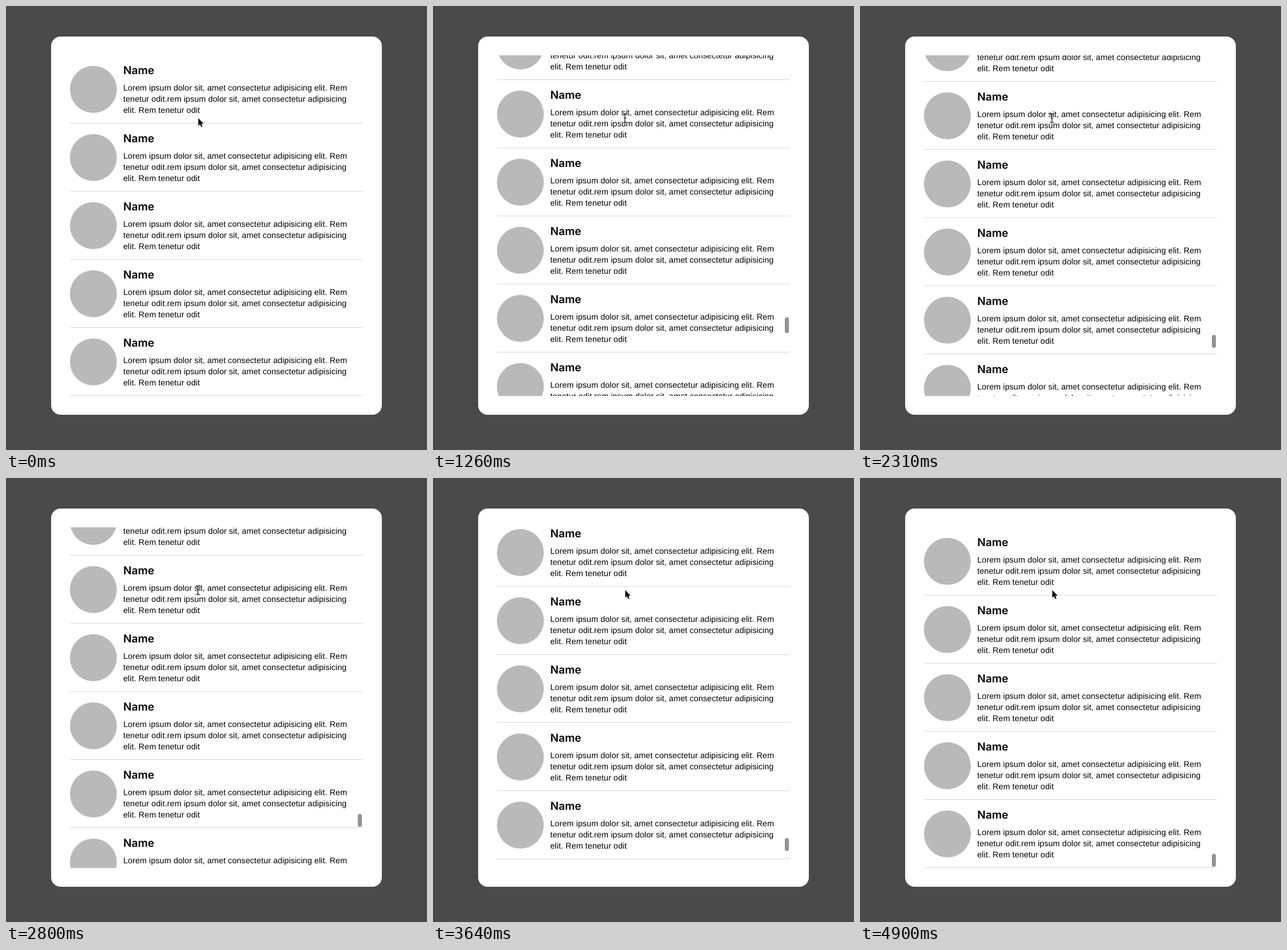
These frames come from a looping animation (718 px wide and 756 px high, 4970 ms). An HTML page:

```html
<!DOCTYPE html>
<html lang="en">
<head>
<meta charset="utf-8">
<title>Endless list</title>
<style>
  html, body { margin: 0; width: 100%; height: 100%; overflow: hidden; background: #4a4a4a; }
  svg { display: block; }
  text { fill: #000; text-rendering: geometricPrecision; }
  .name { font: 600 18.7px Inter, sans-serif; }
  .copy { font: 14px "Liberation Sans", Arial, sans-serif; letter-spacing: .07px; }
</style>
</head>
<body>
<svg width="718" height="756" viewBox="0 0 718 756">
  <defs>
    <clipPath id="view"><rect x="109" y="84" width="500" height="580"/></clipPath>
    <g id="row">
      <circle cx="149" cy="58" r="40" fill="#b9b9b9"/>
      <text class="name" x="200" y="32">Name</text>
      <text class="copy" x="200" y="60">Lorem ipsum dolor sit, amet consectetur adipisicing elit. Rem</text>
      <text class="copy" x="200" y="79">tenetur odit.rem ipsum dolor sit, amet consectetur adipisicing</text>
      <text class="copy" x="200" y="98">elit. Rem tenetur odit</text>
      <rect x="109" y="115" width="500" height="1" fill="#d8d8d8"/>
    </g>
    <path id="stem" d="M324 183q3 0 3.3 2.5q.3-2.5 3.3-2.5M327.3 185.5v11M324 199q3 0 3.3-2.5q.3 2.5 3.3 2.5M325.5 191h3.6"/>
  </defs>
  <rect width="718" height="756" fill="#4a4a4a"/>
  <rect x="77" y="52" width="564" height="644" rx="16" fill="#fff"/>
  <g clip-path="url(#view)">
    <g id="list"></g>
    <rect id="thumb" x="600" width="7" rx="3.5" fill="#929292"/>
  </g>
  <path id="arrow" d="M328 191v13l2.9-2.7 2 4.6 2.1-.9-1.9-4.5h4z"
        stroke="#fff" stroke-width="1.4" paint-order="stroke" stroke-linejoin="round"/>
  <g id="beam" fill="none" stroke-linecap="round">
    <use href="#stem" stroke="#fff" stroke-width="2.4" stroke-opacity=".6"/>
    <use href="#stem" stroke="#000" stroke-width="1.1"/>
  </g>
</svg>
<script>
const LOOP = 4970, STEP = 70;
const TOP = 84, VIEW = 580, ROW = 116, FIRST = 6, PAGE = 20, PAGES = 7;
const POINTER_Y = 191;

// [time, scroll offset]: a fast run down, then shorter swipes near the end
const keys = [
  [0, 0], [630, 3175], [1820, 13538], [2800, 14336],
  [3640, 15559], [4200, 15073], [4900, 16356]
];

const $ = id => document.getElementById(id);
const list = $('list'), thumb = $('thumb'), arrow = $('arrow'), beam = $('beam');

list.innerHTML = Array.from({ length: 6 }, (_, i) => `<use href="#row" y="${i * ROW}"/>`).join('');

// Monotone cubic slopes: harmonic mean of neighbouring speeds, zero at a turn.
const speed = i => (keys[i + 1][1] - keys[i][1]) / (keys[i + 1][0] - keys[i][0]);
const slopes = keys.map((_, i) => {
  if (i === 0) return speed(0) * .6;
  if (i === keys.length - 1) return speed(i - 1) * .6;
  const a = speed(i - 1), b = speed(i);
  return a * b > 0 ? 2 * a * b / (a + b) : 0;
});

function scrollAt(t) {
  let i = 0;
  while (i < keys.length - 2 && t >= keys[i + 1][0]) i++;
  const [t0, s0] = keys[i], [t1, s1] = keys[i + 1];
  const d = t1 - t0, u = Math.min(1, (t - t0) / d), v = 1 - u;
  return Math.round(
    s0 * (1 + 2 * u) * v * v + slopes[i] * d * u * v * v +
    s1 * u * u * (3 - 2 * u) - slopes[i + 1] * d * u * u * v
  );
}

// A page is appended once less than one view is left below the visible part.
function contentHeight(scroll) {
  const needed = Math.ceil((scroll + 2 * VIEW - FIRST * ROW) / (PAGE * ROW));
  return (FIRST + Math.min(PAGES, needed) * PAGE) * ROW;
}

function draw(now) {
  const t = Math.floor(now % LOOP / STEP) * STEP;
  const scroll = scrollAt(t), shift = scroll % ROW;
  list.setAttribute('transform', `translate(0 ${TOP - shift})`);

  const content = contentHeight(scroll), track = VIEW - 4;
  const size = Math.max(22, Math.round(track * VIEW / content));
  const pos = scroll / (content - VIEW) * (track - size);
  thumb.setAttribute('y', TOP + 2 + Math.round(pos));
  thumb.setAttribute('height', size);
  thumb.style.display = scroll ? '' : 'none';

  const y = (POINTER_Y - TOP + shift) % ROW;
  const overText = y > 12 && y < 103;
  arrow.style.display = overText ? 'none' : '';
  beam.style.display = overText ? '' : 'none';
}

const start = performance.now();
function tick() {
  draw(performance.now() - start);
  requestAnimationFrame(tick);
}
tick();
</script>
</body>
</html>
```
